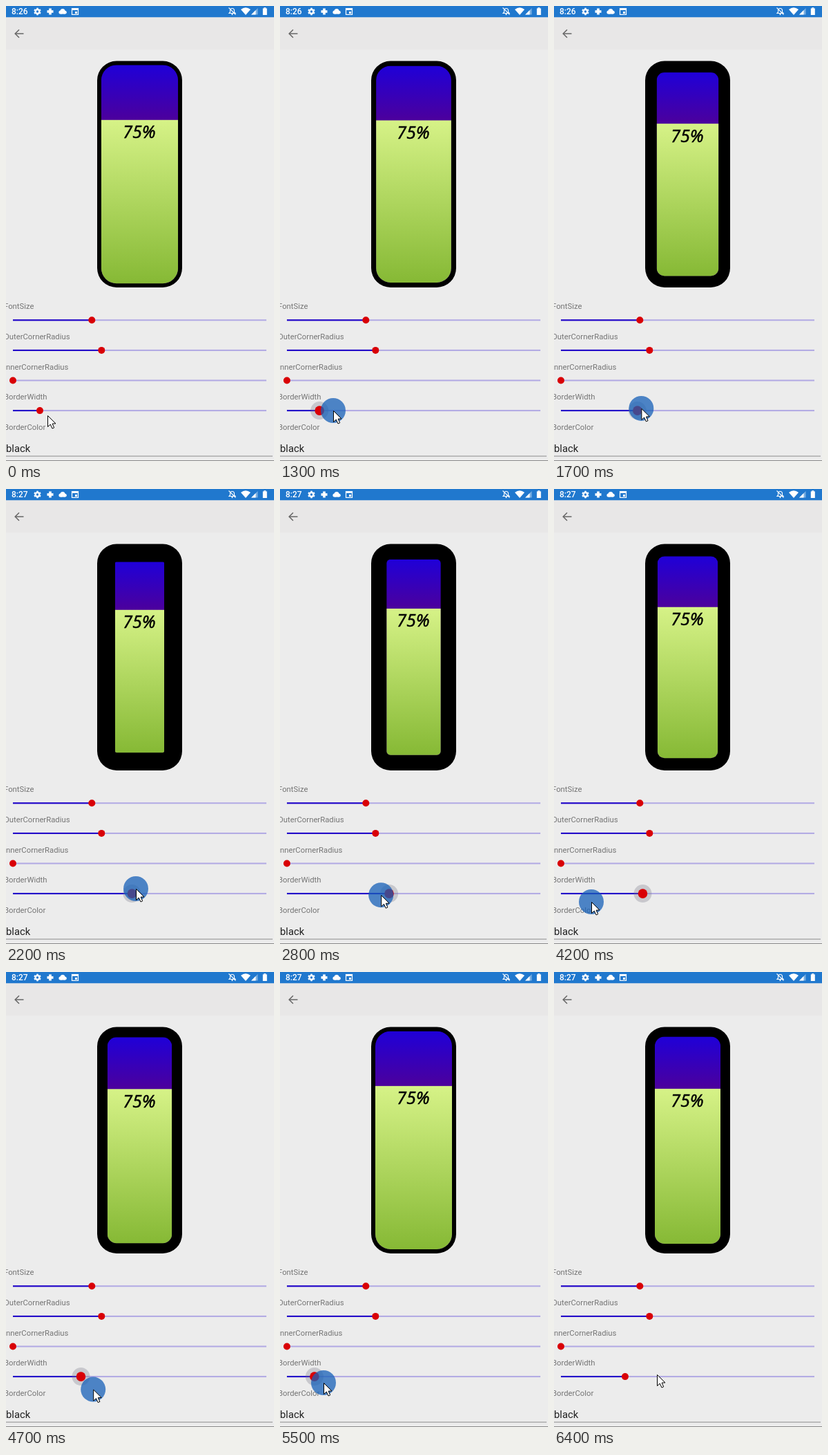
These frames come from a looping animation (388x658 px, 6500 ms). An HTML page with a canvas:

```html
<!DOCTYPE html>
<html lang="en">
<head>
<meta charset="utf-8">
<title>Border width slider</title>
<style>
html, body { margin: 0; width: 100%; height: 100%; overflow: hidden; background: #ececec; }
canvas { display: block; width: 388px; height: 658px; }
</style>
</head>
<body>
<canvas id="stage" width="388" height="658"></canvas>
<script>
const ctx = document.getElementById('stage').getContext('2d');
const LOOP = 6500, STEP = 100;
const PRESS = 400, RELEASE = 6300, LAG = 45;
const TRACK_L = 10, TRACK_R = 377, REST = 49;
const LABEL = '11.3px Roboto, sans-serif';
const GRAY = '#757575';

// turning points of the drag: time, x, y
const turns = [
  [0, 60, 592], [400, 49, 590], [800, 105, 586], [1200, 33, 590],
  [1300, 77, 585], [2200, 188, 578], [2500, 225, 580], [3250, 28, 598],
  [3400, 96, 594], [4090, 236, 586], [4200, 54, 597], [4400, 8, 627],
  [4900, 205, 588], [5380, 28, 597], [5500, 63, 594], [5800, 150, 590],
  [6200, 97, 597], [6400, 149, 582]
];

function pointer(t) {
  const i = Math.max(1, turns.findIndex(p => p[0] >= t));
  const a = turns[i - 1], b = turns[i];
  const k = (t - a[0]) / (b[0] - a[0]);
  return { x: a[1] + (b[1] - a[1]) * k, y: a[2] + (b[2] - a[2]) * k };
}

// the thumb trails the pointer while it is held
function thumbAt(t) {
  if (t < PRESS) return REST;
  return Math.max(TRACK_L, pointer(Math.min(t, RELEASE - STEP) - LAG).x);
}

function rect(x, y, w, h, color) {
  ctx.fillStyle = color;
  ctx.fillRect(x, y, w, h);
}

function disc(x, y, r, color) {
  ctx.fillStyle = color;
  ctx.beginPath();
  ctx.arc(x, y, r, 0, Math.PI * 2);
  ctx.fill();
}

function line(points, width, color) {
  ctx.strokeStyle = color;
  ctx.lineWidth = width;
  ctx.beginPath();
  points.forEach(([x, y]) => ctx.lineTo(x, y));
  ctx.stroke();
}

function text(str, x, y, font, color) {
  ctx.font = font;
  ctx.fillStyle = color;
  ctx.fillText(str, x, y);
}

function ramp(y0, y1, c0, c1) {
  const g = ctx.createLinearGradient(0, y0, 0, y1);
  g.addColorStop(0, c0);
  g.addColorStop(1, c1);
  return g;
}

function gear(x, y) {
  ctx.strokeStyle = '#fff';
  ctx.lineWidth = 2.4;
  ctx.beginPath();
  ctx.arc(x, y, 2.9, 0, Math.PI * 2);
  ctx.stroke();
  for (let i = 0; i < 6; i++) {
    const a = (i + 0.5) * Math.PI / 3, c = Math.cos(a), s = Math.sin(a);
    line([[x + c * 3.5, y + s * 3.5], [x + c * 5.3, y + s * 5.3]], 2.4, '#fff');
  }
}

function cloud(x, y) {
  disc(x - 3, y + 1, 2.6, '#fff');
  disc(x, y - 0.5, 3.5, '#fff');
  disc(x + 3.4, y + 1.2, 2.4, '#fff');
  rect(x - 3, y + 0.5, 6.5, 3.1, '#fff');
}

function calendar(x, y) {
  ctx.strokeStyle = '#fff';
  ctx.lineWidth = 1.2;
  ctx.strokeRect(x - 4.5, y - 4.4, 9, 8.8);
  rect(x - 5, y - 5, 10, 3, '#fff');
  rect(x, y, 3, 3, '#fff');
}

function bellOff(x, y) {
  ctx.strokeStyle = '#fff';
  ctx.lineWidth = 1.1;
  ctx.beginPath();
  ctx.moveTo(x - 4.5, y + 3);
  ctx.lineTo(x - 3, y + 1.5);
  ctx.arc(x, y - 1, 3, Math.PI, 0);
  ctx.lineTo(x + 3, y + 1.5);
  ctx.lineTo(x + 4.5, y + 3);
  ctx.closePath();
  ctx.stroke();
  line([[x - 5, y - 5], [x + 5, y + 5]], 1.1, '#fff');
  disc(x, y + 4.6, 1.1, '#fff');
}

function wifi(x, y) {
  ctx.fillStyle = '#fff';
  ctx.beginPath();
  ctx.moveTo(x - 7, y - 3);
  ctx.quadraticCurveTo(x, y - 8.5, x + 7, y - 3);
  ctx.lineTo(x, y + 5);
  ctx.fill();
}

function wedge(x, y, size, color) {
  ctx.fillStyle = color;
  ctx.beginPath();
  ctx.moveTo(x, y);
  ctx.lineTo(x + size, y);
  ctx.lineTo(x + size, y - size);
  ctx.fill();
}

function statusBar(t) {
  rect(0, 0, 388, 16.5, '#2078ce');
  text(t < 2000 ? '8:26' : '8:27', 8, 12, '500 12px Roboto, sans-serif', '#fff');
  gear(45.5, 8);
  rect(62.2, 3.5, 3.6, 9, '#fff');
  rect(59.5, 6.2, 9, 3.6, '#fff');
  cloud(82, 8);
  calendar(100, 8);
  bellOff(327.5, 7.5);
  wifi(347, 8);
  wedge(355, 12.5, 9.5, 'rgba(255,255,255,.4)');
  wedge(355, 12.5, 6.5, '#fff');
  rect(371.8, 3.4, 6, 9.6, '#fff');
  rect(373.3, 2.2, 3, 1.5, '#fff');
}

function toolbar() {
  rect(0, 16.5, 388, 46.5, '#e8e7e7');
  line([[25.5, 40], [13.5, 40]], 1.5, '#666');
  line([[19, 34.2], [13.2, 40], [19, 45.8]], 1.5, '#666');
}

function gauge(border) {
  const x = 132, y = 79.5, w = 123, h = 327.5, r = 28;
  const ix = x + border, iy = y + border, iw = w - 2 * border, ih = h - 2 * border;
  const level = iy + ih * 0.25 + 0.5;
  ctx.fillStyle = '#000';
  ctx.beginPath();
  ctx.roundRect(x, y, w, h, r);
  ctx.fill();
  ctx.save();
  ctx.beginPath();
  ctx.roundRect(ix, iy, iw, ih, Math.max(0, r - border));
  ctx.clip();
  rect(ix, iy, iw, ih, ramp(iy, level, '#1f00d8', '#4c009c'));
  rect(ix, level, iw, ih, ramp(level, iy + ih, '#d6f287', '#86b935'));
  ctx.restore();

  ctx.textAlign = 'center';
  text('75%', 193, level + 26.5, 'italic 25px "Open Sans", sans-serif', '#000');
  ctx.strokeStyle = '#000';
  ctx.lineWidth = 0.5;
  ctx.strokeText('75%', 193, level + 26.5);
  ctx.textAlign = 'left';
}

function slider(label, row, x, pressed) {
  const y = 454.3 + row * 43.6;
  text(label, -3, y - 16, LABEL, GRAY);
  rect(TRACK_L, y - 1, TRACK_R - TRACK_L, 2, '#b1a9e4');
  rect(TRACK_L, y - 1, x - TRACK_L, 2, '#1c00c8');
  if (pressed) disc(x, y, 13, 'rgba(125,125,140,.32)');
  disc(x, y, pressed ? 6.8 : 5, '#d90006');
}

function cursor(x, y) {
  const arrow = new Path2D('M0 0V16L3.8 12.6L6.5 18.5L9.2 17.3L6.6 11.6L11.5 11.4Z');
  ctx.save();
  ctx.translate(x + 0.5, y + 0.5);
  ctx.fillStyle = '#fff';
  ctx.fill(arrow);
  ctx.strokeStyle = '#000';
  ctx.lineWidth = 1;
  ctx.stroke(arrow);
  ctx.restore();
}

function draw(t) {
  const p = pointer(t), thumb = thumbAt(t);
  const pressed = t >= PRESS && t < RELEASE;
  rect(0, 0, 388, 658, '#ececec');
  statusBar(t);
  toolbar();
  gauge((thumb - TRACK_L) * 0.15);
  slider('FontSize', 0, 124.3);
  slider('OuterCornerRadius', 1, 138.3);
  slider('InnerCornerRadius', 2, TRACK_L);
  slider('BorderWidth', 3, thumb, pressed);
  text('BorderColor', -3, 612.8, LABEL, GRAY);
  text('black', 0, 645, '14.8px Roboto, sans-serif', '#222');
  rect(0, 650.5, 386, 1, '#8c8c8c');
  rect(0, 657, 388, 1, '#8a8a8a');
  if (pressed) disc(p.x, p.y, 18, 'rgba(23,97,185,.75)');
  cursor(p.x, p.y);
}

const start = performance.now();
function tick() {
  const t = (performance.now() - start) % LOOP;
  draw(Math.floor(t / STEP) * STEP);
  requestAnimationFrame(tick);
}
tick();
</script>
</body>
</html>
```
